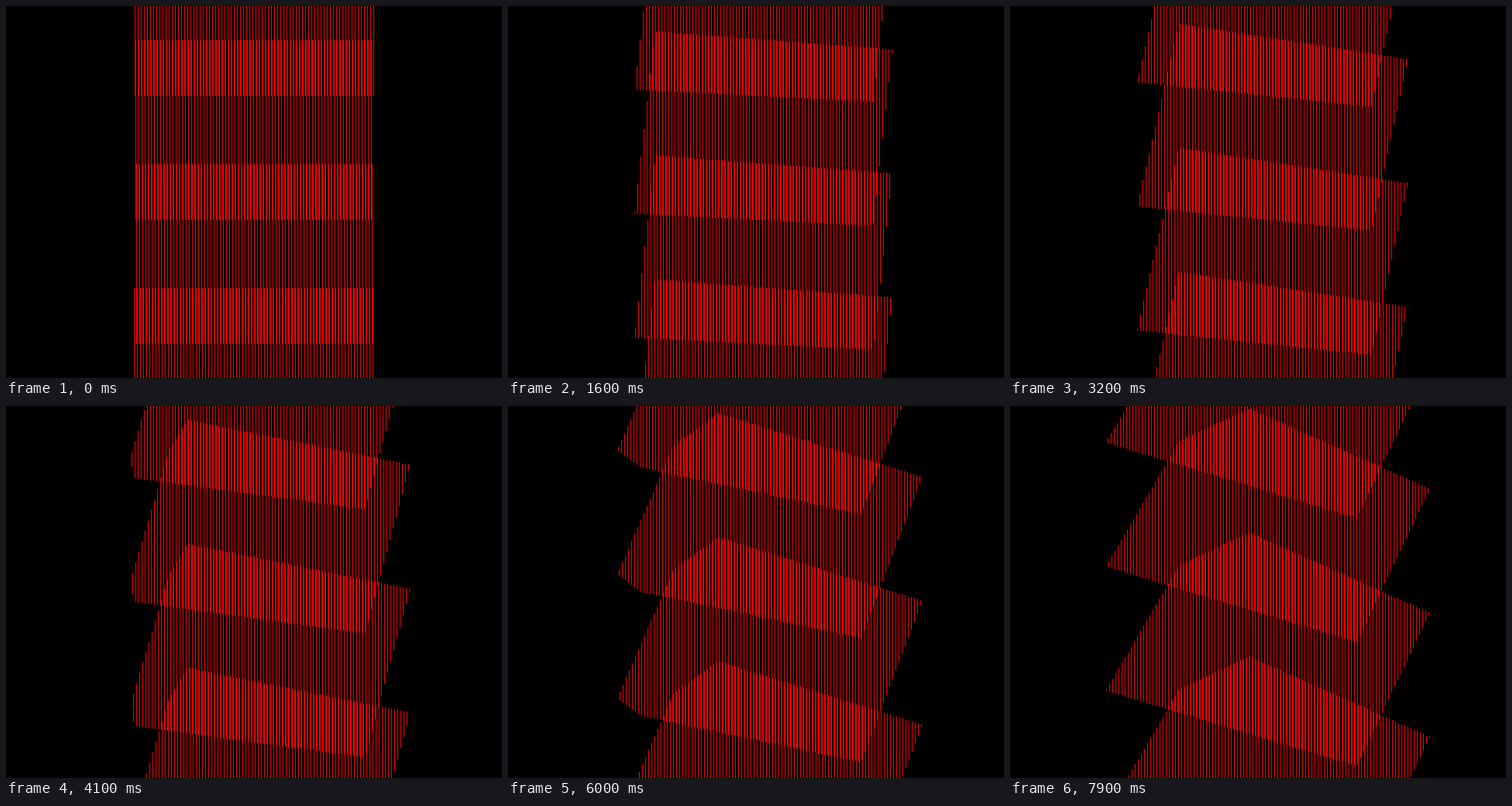
Write an HTML page with a canvas that moves like this. It is 640x480 px and loops after 8 s.

```html
<!DOCTYPE html>
<html lang="en">
<head>
<meta charset="utf-8">
<title>Interlaced cubes</title>
<style>
  html, body { margin: 0; width: 100%; height: 100%; overflow: hidden; background: #000; }
  canvas { display: block; width: 640px; height: 480px; }
</style>
</head>
<body>
<canvas id="stage" width="640" height="480"></canvas>
<script>
const ctx = document.getElementById('stage').getContext('2d');
const W = 640, H = 480;
const LOOP = 8000, STEP = 100;
const SPEED = Math.PI / 60;           // radians per second
const EYE = 6.1;                      // eye distance in half cube edges
const SCALE = 116.2 * (EYE - 1);
const STRETCH = 4 / 3;
const CENTER_X = 319.6;
const GAP = 160;

const corners = [];
for (const x of [-1, 1]) for (const y of [-1, 1]) for (const z of [-1, 1]) corners.push([x, y, z]);

// Roll, then yaw by the same angle, then perspective.
function project([x, y, z], angle) {
  const c = Math.cos(angle), s = Math.sin(angle);
  const rx = x * c - y * s, ry = x * s + y * c;
  const k = SCALE / (EYE - (z * c - rx * s));
  return [CENTER_X + (rx * c + z * s) * k * STRETCH, ry * k];
}

// Vertical extent of the silhouette at x: the extremes over all corner pairs.
function extent(points, x) {
  let top = Infinity, bottom = -Infinity;
  points.forEach(([ax, ay], i) => {
    for (const [bx, by] of points.slice(i + 1)) {
      if (ax === bx || (ax - x) * (bx - x) > 0) continue;
      const y = ay + (by - ay) * (x - ax) / (bx - ax);
      top = Math.min(top, y);
      bottom = Math.max(bottom, y);
    }
  });
  return [top, bottom];
}

function draw(time) {
  const points = corners.map(p => project(p, SPEED * time / 1000));
  ctx.fillStyle = '#000';
  ctx.fillRect(0, 0, W, H);
  ctx.fillStyle = '#f00';
  // Each cube owns one of every four pixel columns.
  for (let x = 0; x < W; x++) {
    const [top, bottom] = extent(points, x + 0.5);
    if (top > bottom) continue;
    const y = (x + 2) % 4 * GAP;
    const y0 = Math.round(y + top), y1 = Math.round(y + bottom);
    ctx.fillRect(x, y0, 1, y1 - y0);
  }
}

const start = performance.now();
let shown = -1;
function tick() {
  const elapsed = (performance.now() - start) % LOOP;
  const time = Math.floor(elapsed / STEP) * STEP;
  if (time !== shown) draw(shown = time);
  requestAnimationFrame(tick);
}
tick();
</script>
</body>
</html>
```
